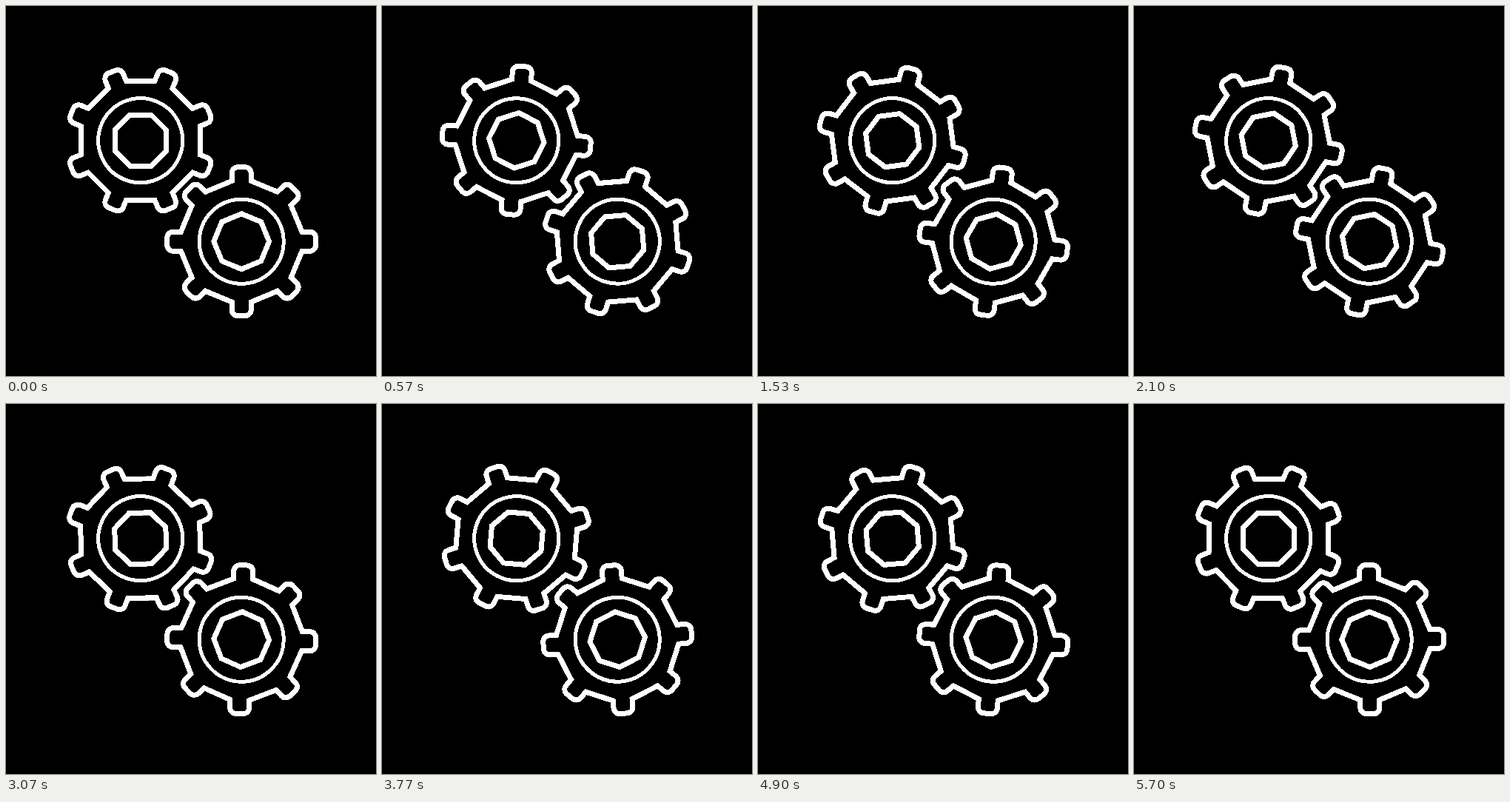
Animation, 500 px wide and 500 px high, one loop 5730 ms. Source, as an HTML page with a canvas:

```html
<!DOCTYPE html>
<html lang="en">
<head>
<meta charset="utf-8">
<title>Gears</title>
<style>
  html, body { margin: 0; height: 100%; overflow: hidden; background: #000; }
  /* Strong contrast gives the hard, two-tone edges. */
  canvas { display: block; filter: contrast(40); }
</style>
</head>
<body>
<canvas id="stage" width="500" height="500"></canvas>
<script>
const ctx = document.getElementById('stage').getContext('2d');
const TEETH = 8, LOOP = 5730, STEPS_PER_TURN = 36;
const HALF_WIDTH = 13, BASE = 81.8, TIP = 100.4, CORNER = 8, HUB = 37.4;

// Repeats one section of outline around the centre and closes it.
function ring(section) {
  ctx.beginPath();
  for (let i = 0; i < TEETH; i++) {
    section();
    ctx.rotate(2 * Math.PI / TEETH);
  }
  ctx.closePath();
  ctx.lineWidth = 7;
  ctx.stroke();
}

function tooth() {
  ctx.lineTo(-HALF_WIDTH, -BASE);
  ctx.arcTo(-HALF_WIDTH, -TIP, 0, -TIP, CORNER);
  ctx.arcTo(HALF_WIDTH, -TIP, HALF_WIDTH, -BASE, CORNER);
  ctx.lineTo(HALF_WIDTH, -BASE);
}

function gear(center, degrees) {
  ctx.save();
  ctx.translate(center, center);
  ctx.rotate(degrees * Math.PI / 180);
  ring(tooth);
  ring(() => ctx.lineTo(0, -HUB));
  ctx.beginPath();
  ctx.arc(0, 0, 57, 0, 2 * Math.PI);
  ctx.lineWidth = 5;
  ctx.stroke();
  ctx.restore();
}

// 12.5 poses per second, shown on a 30 Hz clock; each half turn eases in and out.
function angleAt(ms) {
  const tick = Math.floor((ms % LOOP + 4) * 0.03);
  const step = Math.floor(tick * 5 / 12);
  const p = step % STEPS_PER_TURN / STEPS_PER_TURN;
  return 180 * p * p * (3 - 2 * p);
}

function draw() {
  const angle = angleAt(performance.now() - start);
  ctx.fillStyle = '#000';
  ctx.fillRect(0, 0, 500, 500);
  ctx.strokeStyle = '#fff';
  gear(181.7, 22.5 - angle);
  gear(318.2, angle);
  requestAnimationFrame(draw);
}

const start = performance.now();
draw();
</script>
</body>
</html>
```
